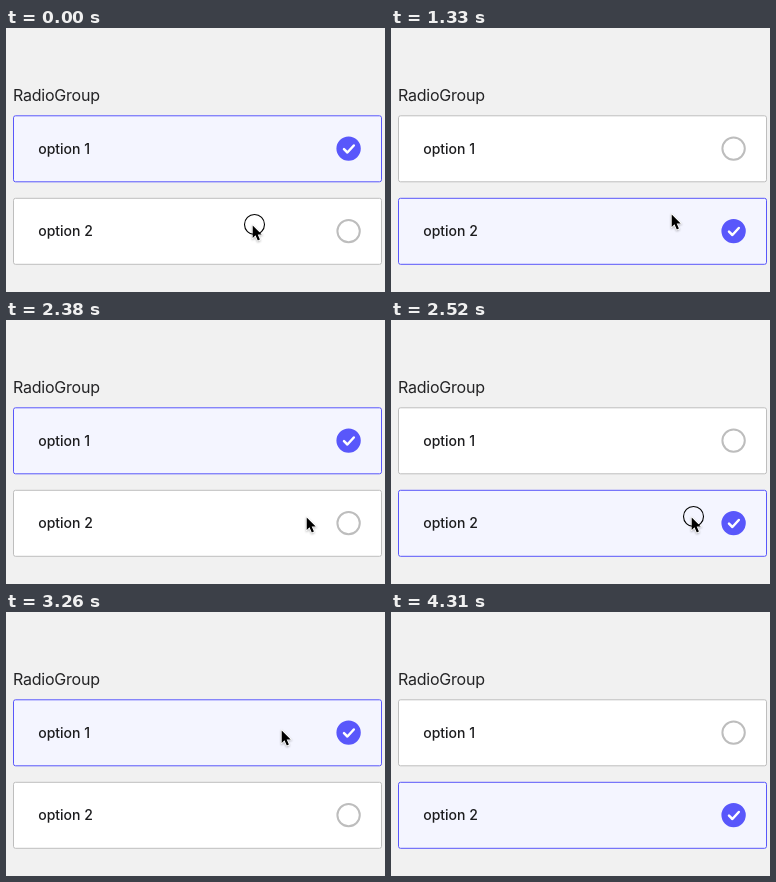
Write an HTML page that moves like this. It is 379 by 264 pixels and loops after 4600 ms.

```html
<!DOCTYPE html>
<html lang="en">
<head>
<meta charset="utf-8">
<title>Radio group</title>
<style>
  html, body { margin: 0; width: 100%; height: 100%; overflow: hidden; background: #f1f1f1; }
  svg { display: block; }
  text { font-family: Inter, "Open Sans", sans-serif; fill: #1c1c1e; }
  .title { font-size: 16px; letter-spacing: -0.22px; fill: #232325; }
  .label { font-size: 14px; font-weight: 500; }
  .card { fill: #fff; stroke: #bebebe; }
  .ring { fill: #fff; stroke: #bdbdbd; stroke-width: 2; }
  .check { fill: none; stroke: #fff; stroke-width: 2.5; stroke-linecap: round; stroke-linejoin: round; visibility: hidden; }
  .selected .card { fill: #f4f5ff; stroke: #5957fb; }
  .selected .ring { fill: #5957fb; stroke: #5957fb; }
  .selected .check { visibility: visible; }
</style>
</head>
<body>
<svg width="379" height="264" viewBox="0 0 379 264">
  <defs>
    <path id="arrow" d="M1.7 .4V12.9L4.5 10.2L6.8 15.5L8.9 14.6L6.7 9.4H10.7Z"/>
    <filter id="soft" x="-50%" y="-50%" width="200%" height="200%">
      <feGaussianBlur stdDeviation=".8"/>
    </filter>
  </defs>
  <rect width="379" height="264" fill="#f1f1f1"/>
  <text class="title" x="7" y="73.4">RadioGroup</text>
  <g id="options"></g>
  <g id="pointer">
    <use href="#arrow" y="1" fill="#000" stroke="#000" stroke-width="1.4" opacity=".3" filter="url(#soft)"/>
    <use href="#arrow" fill="#fff" stroke="#fff" stroke-width="1.8" stroke-linejoin="round"/>
    <circle id="press" cx="3.5" cy="-.5" r="10" fill="none" stroke="#000" stroke-width="1.1"/>
    <use href="#arrow" fill="#000"/>
  </g>
</svg>
<script>
const LOOP = 4600;
const STEP = 148.4; // the screen refreshes in steps of this many ms
const LEAD_IN = 10;

// Steps at which the pointer arrives; travel is the length of the move before it.
// A stop with hold is a click, and pick is the step at which it selects.
const stops = [
  { at: 0, x: 245, y: 197, hold: 2 },
  { at: 5, x: 279, y: 209, travel: 1.17, hold: 1, pick: 6 },
  { at: 8, x: 283, y: 209, travel: 1 },
  { at: 11, x: 272, y: 140, travel: 2.17, hold: 1, pick: 12 },
  { at: 17, x: 299, y: 197, travel: 3, hold: 1, pick: 17 },
  { at: 21, x: 274, y: 118, travel: 2.07, hold: 1, pick: 22 },
  { at: 25, x: 306, y: 207, travel: 2.07, hold: 1, pick: 26 },
  { at: 28, x: 348, y: 262, travel: 1 },
  { at: 29, x: 390, y: 317, travel: 1 }
];

const byId = id => document.getElementById(id);
const pointer = byId("pointer");
const press = byId("press");
const easeOut = u => 1 - (1 - u) ** 5;
const clamp = u => Math.min(1, Math.max(0, u));

byId("options").innerHTML = [1, 2].map((n, i) => `
  <g transform="translate(0 ${i * 82.5})">
    <rect class="card" x="7.5" y="87.8" width="368" height="66" rx="2"/>
    <text class="label" x="32.2" y="125.7">option ${n}</text>
    <circle class="ring" cx="342.6" cy="120.6" r="11.2"/>
    <path class="check" d="M338 121.2L341.4 124.5L347.8 117.5"/>
  </g>`).join("");
const options = [...byId("options").children];

function pointerAt(step) {
  let { x, y } = stops[0];
  for (const stop of stops.slice(1)) {
    const k = easeOut(clamp(1 - (stop.at - step) / stop.travel));
    x += (stop.x - x) * k;
    y += (stop.y - y) * k;
  }
  return [x, y];
}

function render(t) {
  const step = Math.floor((t + LEAD_IN) / STEP);
  pointer.setAttribute("transform", `translate(${pointerAt(step).map(Math.round).join(" ")})`);

  const pressed = stops.some(({ at, hold = 0 }) => step >= at && step < at + hold);
  press.setAttribute("visibility", pressed ? "visible" : "hidden");

  const picked = stops.findLast(({ pick }) => pick <= step);
  const selected = picked && picked.y > 160 ? 1 : 0;
  options.forEach((option, i) => option.classList.toggle("selected", i === selected));
}

const begin = performance.now();
function tick() {
  render((performance.now() - begin) % LOOP);
  requestAnimationFrame(tick);
}
tick();
</script>
</body>
</html>
```
